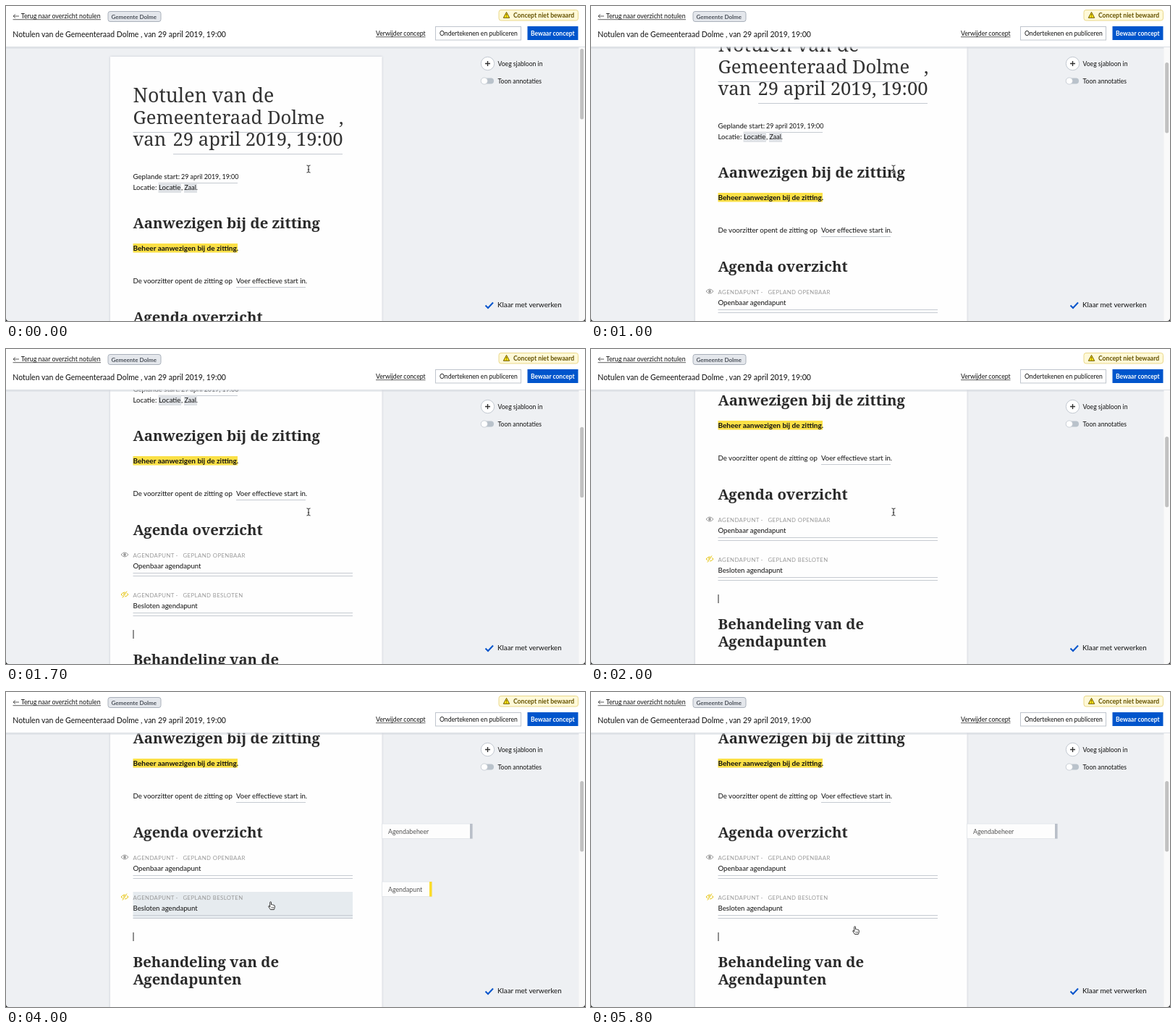
Recreate the animation shown at these times as an HTML page. Size 800 px wide and 435 px high, loop 6000 ms.

```html
<!DOCTYPE html>
<html lang="nl">
<head>
<meta charset="utf-8">
<title>Notulen</title>
<style>
  html, body { margin: 0; width: 100%; height: 100%; overflow: hidden; background: #eef0f3; }
  svg { display: block; width: 800px; height: 435px; }
  text { font: 8.65px Lato, sans-serif; fill: #111; }
  .body { font-size: 9.65px; }
  .bold { font-weight: 700; }
  .date { font-size: 8.9px; }
  .label { font-size: 7.8px; letter-spacing: .4px; fill: #999; }
  .title { font: 300 25.6px "Noto Serif", serif; fill: #333; }
  .h2 { font: 700 20.3px "Noto Serif", serif; fill: #2a2a2a; }
  .tab text { font-size: 8.8px; fill: #555; }
  .rule { stroke: #c5cad1; stroke-width: 1; }
  .line { stroke: #333; stroke-width: .8; }
</style>
</head>
<body>
<svg viewBox="0 0 800 435">
  <defs>
    <filter id="soft" x="-5%" y="-5%" width="110%" height="110%">
      <feDropShadow dx="0" dy="0" stdDeviation="1.5" flood-color="#8a93a0" flood-opacity=".45"/>
    </filter>
    <g id="eye" fill="none" stroke="currentColor">
      <path d="M-5 0Q0-6 5 0Q0 6-5 0Z" stroke-width="1"/>
      <circle r="1.9" fill="currentColor" stroke="none"/>
    </g>
    <path id="ibeam" d="M-2.5-5Q0-5 0-3.5Q0-5 2.5-5M0-3.5V3.5M-2.5 5Q0 5 0 3.5Q0 5 2.5 5M-1.2 1h2.4"/>
  </defs>
  <rect width="800" height="435" fill="#eef0f3"/>

  <g id="doc">
    <rect x="144" y="70" width="375.5" height="900" fill="#fefefe" filter="url(#soft)"/>
    <path class="rule" d="M175.5 174.5H455M231 204.5H465M242 244.5H320M318 388.5H414"/>
    <text class="title" x="175.5" y="132.5" style="font-size:26.8px">Notulen van de</text>
    <text class="title" x="175.5" y="162.7">Gemeenteraad Dolme</text>
    <text class="title" x="460" y="162.7">,</text>
    <text class="title" x="175.5" y="192.8">van</text>
    <text class="title" x="230.5" y="192.8">29 april 2019, 19:00</text>

    <path d="M210.5 243.5h31.5v14.5h-31.5zM246 243.5h18v14.5h-18z" fill="#dfe2e6"/>
    <text class="body" x="175.5" y="238.5">Geplande start:</text>
    <text class="date" x="242" y="238.5">29 april 2019, 19:00</text>
    <text class="body" x="175.5" y="253.5">Locatie:</text>
    <text class="body" x="211" y="253.5">Locatie</text>
    <text class="body" x="242" y="253.5">,</text>
    <text class="date" x="246.5" y="253.5">Zaal.</text>

    <text class="h2" x="175.5" y="307">Aanwezigen bij de zitting</text>
    <rect x="175.5" y="328" width="144.5" height="12.5" fill="#fbe046"/>
    <text class="body bold" x="175.5" y="337.8" style="font-size:10px">Beheer aanwezigen bij de zitting.</text>
    <text class="body" x="175.5" y="383">De voorzitter opent de zitting op</text>
    <text class="body" x="318" y="383">Voer effectieve start in.</text>

    <text class="h2" x="175.5" y="436.5">Agenda overzicht</text>
    <g id="items"></g>
    <rect id="caret" x="175.5" y="568" width="1" height="12" fill="#222"/>
    <text class="h2" x="175.5" y="616">Behandeling van de</text>
    <text class="h2" x="175.5" y="640">Agendapunten</text>
  </g>

  <g id="tabs"></g>

  <rect y="57" width="800" height="2" fill="#d5d9df" opacity=".5"/>
  <rect width="800" height="56.5" fill="#fff"/>
  <path d="M0 56.7H800" stroke="#cfd4da" stroke-width=".8"/>
  <path class="line" fill="none" d="M18 14H10M13 11.5L10 14L13 16.5"/>
  <text x="20.8" y="17" style="font-size:8.8px">Terug naar overzicht notulen</text>
  <path class="line" d="M9.5 18.7H131M511 42.7H579.5"/>
  <rect x="141" y="7.5" width="73" height="14" rx="3" fill="#e4e7ec" stroke="#a9b0ba"/>
  <text class="bold" x="145.5" y="17.5" style="font-size:8px;fill:#4c525b">Gemeente Dolme</text>
  <text x="9.3" y="43" style="font-size:10.5px">Notulen van de Gemeenteraad Dolme , van 29 april 2019, 19:00</text>

  <rect x="681" y="5.5" width="109.5" height="14.5" rx="3" fill="#fff9d8" stroke="#ead88a"/>
  <path d="M691.5 8.5L695.7 16.3H687.3Z" fill="#ffe615" stroke="#6b5600" stroke-linejoin="round"/>
  <path d="M691.5 11v2.6m0 .8v1" stroke="#6b5600" stroke-width=".9"/>
  <text class="bold" x="701" y="16" style="fill:#655300">Concept niet bewaard</text>
  <text x="511" y="41">Verwijder concept</text>
  <rect x="593.5" y="28.5" width="118" height="18.5" fill="#fff" stroke="#bfc5cd"/>
  <text x="599" y="41">Ondertekenen en publiceren</text>
  <rect x="720.5" y="28" width="70" height="19" fill="#0055cc"/>
  <text class="bold" x="725" y="41" style="font-size:8.5px;fill:#fff">Bewaar concept</text>

  <circle cx="665.5" cy="79.5" r="9.2" fill="#fff" stroke="#c3c9d1"/>
  <path d="M662 79.5h7m-3.5-3.5v7" stroke="#333" stroke-width="1.4"/>
  <text x="679.5" y="82.7">Voeg sjabloon in</text>
  <rect x="656" y="99.5" width="18" height="8" rx="4" fill="#b9c2cb"/>
  <circle cx="660.8" cy="103.5" r="4.6" fill="#fff" stroke="#c3c9d1" stroke-width=".8"/>
  <text x="679.5" y="107">Toon annotaties</text>
  <path d="M662.5 413.5L666 417L673 409.5" fill="none" stroke="#0055cc" stroke-width="2"/>
  <text x="679" y="416.3" style="font-size:9.8px">Klaar met verwerken</text>

  <rect x="791.5" y="57" width="8.5" height="378" fill="#fafafa"/>
  <rect id="thumb" x="793.2" y="59" width="5" height="97.5" rx="2.5" fill="#c1c1c1"/>
  <path d="M0 431Q0 435 4 435H0ZM800 431Q800 435 796 435H800Z" fill="#222"/>

  <g id="beam" fill="none">
    <use href="#ibeam" stroke="#fff" stroke-width="2.2" opacity=".7"/>
    <use href="#ibeam" stroke="#222"/>
  </g>
  <g id="hand">
    <path d="M-2.3 2V-4.3Q-2.3-5.3-1.4-5.3T-.5-4.3V-1.3Q.6-2 1.2-1Q2.3-1.5 2.8-.6Q4.4-.8 4.4 .8Q4.4 3.6 3.3 5.5H-1.6Q-2.6 3.8-4.2 1.6Q-4.6 .7-3.8 .4T-2.3 2Z"
      fill="#fff" stroke="#222" stroke-width=".9" stroke-linejoin="round"/>
    <path d="M-.1 1.8v2M1.3 1.8v2M2.7 1.8v2" stroke="#222" stroke-width=".6"/>
  </g>
</svg>

<script>
const LOOP = 6000, STEP = 100;
const $ = id => document.getElementById(id);

const item = (n, top, kind, title, color, slash) => `
  <rect id="item${n}" x="175.5" y="${top}" width="303.5" height="36.5" fill="#e6ebef"/>
  <rect id="row${n}" x="175.5" y="${top + 15}" width="303.5" height="18" fill="#d5dce1"/>
  <g transform="translate(164 ${top + 7})" color="${color}"><use href="#eye"/>
    ${slash ? '<path d="M-2.5 4.5L3.5-4.5" stroke="#fff" stroke-width="2.6"/><path d="M-3 4.5L3-4.5" stroke="currentColor"/>' : ''}</g>
  <text class="label" x="175.5" y="${top + 10.5}">AGENDAPUNT</text>
  <text class="label" x="234.5" y="${top + 10.5}">-</text>
  <text class="label" x="244.5" y="${top + 10.5}">GEPLAND ${kind}</text>
  <text class="body" x="175.5" y="${top + 26}">${title}</text>
  <path class="rule" d="M175.5 ${top + 32.5}H479M175.5 ${top + 36.5}H479"/>`;

const tab = (id, x, y, w, label, color, pad = 8.5) => `
  <g id="${id}" class="tab">
    <rect x="${x}" y="${y}" width="${w}" height="20.5" fill="#fdfdfd" stroke="#dfe3e8" stroke-width=".8"/>
    <rect x="${x + w - 3.5}" y="${y}" width="3.5" height="20.5" fill="${color}"/>
    <text x="${x + pad}" y="${y + 13.5}">${label}</text>
  </g>`;

$('items').innerHTML =
  item(1, 457, 'OPENBAAR', 'Openbaar agendapunt', '#999') +
  item(2, 512, 'BESLOTEN', 'Besloten agendapunt', '#e5c30c', true);

const YELLOW = '#fbdc2a';
$('tabs').innerHTML =
  tab('beheer', 519.5, 182, 125, 'Agendabeheer', '#b9bfc8') +
  tab('punt1', 519.5, 207, 69, 'Agendapunt', YELLOW) +
  tab('titel1', 588.5, 236.5, 68.5, 'Titel', YELLOW, 6) +
  tab('punt2', 519.5, 262, 69, 'Agendapunt', YELLOW) +
  tab('titel2', 588.5, 291.5, 68.5, 'Titel', YELLOW, 6);

// [time, scroll offset]
const scroll = [[0, 0], [600, 33], [1300, 105], [1700, 180], [2000, 229], [2100, 236]];
// [time, x, y]
const pointer = [[2300, 418, 225], [2600, 385, 242], [2700, 382, 243], [3400, 378, 246],
  [3800, 368, 288], [4000, 367, 295], [4400, 367, 298], [5100, 367, 299], [5500, 366, 328], [5600, 366, 329]];
// id: [show from, fade in, hide at]
const spans = {
  beheer: [2300, 200, LOOP],
  item1: [2400, 0, 3600], row1: [2600, 0, 3500], punt1: [2300, 200, 3600], titel1: [2500, 400, 3500],
  item2: [3700, 0, 5400], row2: [4100, 0, 5300], punt2: [3700, 200, 5400], titel2: [4000, 400, 5300]
};

function segment(keys, t) {
  const i = keys.findIndex(k => k[0] > t);
  return i < 0 ? keys.length - 1 : Math.max(i, 1);
}

function linear(keys, t, col) {
  const i = segment(keys, t), a = keys[i - 1], b = keys[i];
  const p = Math.min(1, Math.max(0, (t - a[0]) / (b[0] - a[0])));
  return a[col] + (b[col] - a[col]) * p;
}

// Hermite curve through the keys, at rest at both ends
function smooth(keys, t) {
  const i = segment(keys, t), [t0, y0] = keys[i - 1], [t1, y1] = keys[i];
  const slope = j => j > 0 && j < keys.length - 1
    ? (keys[j + 1][1] - keys[j - 1][1]) / (keys[j + 1][0] - keys[j - 1][0]) : 0;
  const d = t1 - t0, p = Math.min(1, (t - t0) / d), q = 1 - p;
  return q * q * (1 + 2 * p) * y0 + p * q * q * d * slope(i - 1)
    + p * p * (3 - 2 * p) * y1 - p * p * q * d * slope(i);
}

function draw(t) {
  const y = Math.round(smooth(scroll, t));
  $('doc').setAttribute('transform', `translate(0 ${-y})`);
  $('thumb').setAttribute('y', 59 + y * .271);
  $('caret').style.opacity = (t + 400) % 1000 < 500 ? 1 : 0;

  for (const [id, [from, fade, end]] of Object.entries(spans)) {
    const shown = t >= from && t < end;
    $(id).style.opacity = !shown ? 0 : fade ? Math.min(1, (t - from) / fade) : 1;
  }

  const place = `translate(${linear(pointer, t, 1)} ${linear(pointer, t, 2)})`;
  const over = t >= 2400;
  for (const [id, on] of [['beam', !over], ['hand', over]]) {
    $(id).setAttribute('transform', place);
    $(id).style.opacity = on ? 1 : 0;
  }
}

function tick() {
  draw(Math.floor(performance.now() % LOOP / STEP) * STEP);
  requestAnimationFrame(tick);
}
tick();
</script>
</body>
</html>
```
